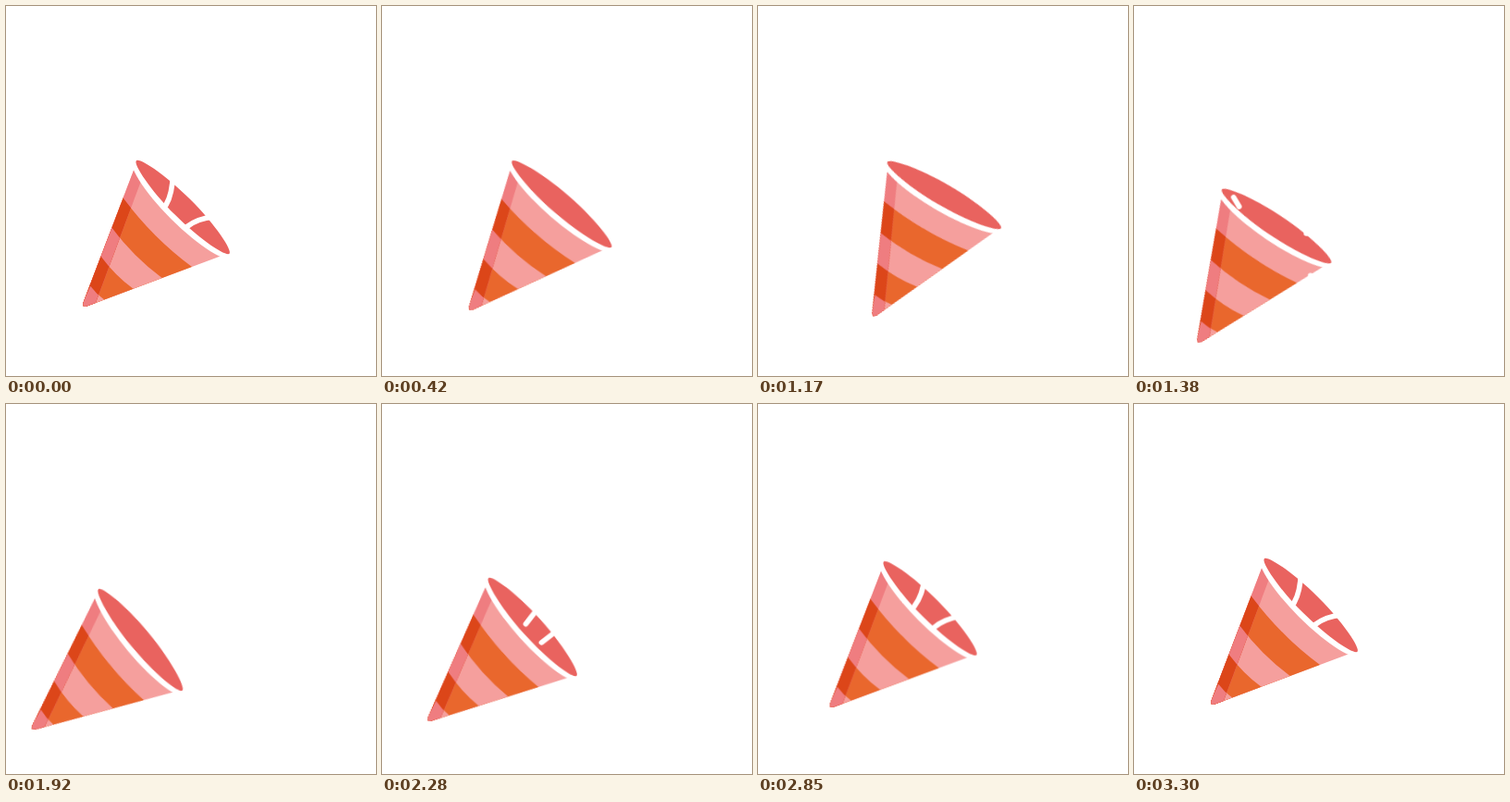
These frames come from a looping animation (400 by 400 pixels, 5.33 s). An HTML page without scripts:

```html
<!DOCTYPE html>
<html lang="en">
<head>
<meta charset="utf-8">
<title>Party popper</title>
<style>
  html, body { margin: 0; width: 100%; height: 100%; overflow: hidden; background: #fff; }
  svg { display: block; width: 100%; height: 100%; }

  .shift, .tilt, .strand, .bit { animation: 5.33s linear infinite; }
  .shift { animation-name: shift; }
  .tilt { animation-name: tilt; transform-origin: 146px 172px; }

  .light { --pink: #f59f9d; --orange: #e9672d; }
  .shade { --pink: #ef7d80; --orange: #dc4619; }
  .pink { fill: var(--pink); }
  .orange { fill: var(--orange); }

  .strand, .bit { fill: none; stroke: #fff; stroke-width: 5.6; stroke-linecap: round; }
  .left { animation-name: left; }
  .right { animation-name: right; }
  .bit { animation-name: fly; visibility: hidden; }

  /* recoil, then a slow drift back */
  @keyframes shift {
    0%, 22.51% { transform: translate(0, 0); }
    25.89% { transform: translate(-45px, 30px); }
    28.14% { transform: translate(-49px, 38px); }
    30.39% { transform: translate(-47px, 39px); }
    33.21% { transform: translate(-46px, 37px); }
    36.02% { transform: translate(-41.5px, 33.5px); }
    40.53% { transform: translate(-31px, 25px); }
    42.78% { transform: translate(-26px, 21.3px); }
    50.66% { transform: translate(-10px, 6.5px); }
    53.47% { transform: translate(-5px, 3.3px); }
    61.91%, 100% { transform: translate(0, 0); }
  }
  @keyframes tilt {
    0% { transform: rotate(0deg); animation-timing-function: cubic-bezier(.364, 0, .636, 1); }
    22.51% { transform: rotate(-14.8deg); }
    25.89% { transform: rotate(-11.2deg); }
    28.14% { transform: rotate(-6.5deg); }
    30.39% { transform: rotate(0deg); }
    33.21% { transform: rotate(4.6deg); }
    36.02% { transform: rotate(5.4deg); }
    42.78% { transform: rotate(3deg); }
    50.66% { transform: rotate(.7deg); }
    53.47% { transform: rotate(.2deg); }
    61.91%, 100% { transform: rotate(0deg); }
  }

  /* streamers pull in, then grow back */
  @keyframes left {
    0%, 61.91%, 100% { d: path("M180.5 181Q180 203 173 215"); visibility: visible; }
    7.5% { d: path("M172 217Q172 217 172 217"); visibility: visible; }
    7.51%, 39.95% { d: path("M203 189Q203 189 203 189"); visibility: hidden; }
    39.96% { d: path("M203 189Q203 189 203 189"); visibility: visible; }
    42.78% { d: path("M199 193Q191 204 183.7 214.7"); visibility: visible; }
    53.47% { d: path("M185 184Q183.5 203 174 215.5"); visibility: visible; }
  }
  @keyframes right {
    0%, 61.91%, 100% { d: path("M225 228Q207 229.5 195 239"); visibility: visible; }
    7.5% { d: path("M193 240Q193 240 193 240"); visibility: visible; }
    7.51%, 39.95% { d: path("M226 213Q226 213 226 213"); visibility: hidden; }
    39.96% { d: path("M226 213Q226 213 226 213"); visibility: visible; }
    42.78% { d: path("M221 217Q211 226 201.7 233.8"); visibility: visible; }
    53.47% { d: path("M224 226Q206 229 195 238.5"); visibility: visible; }
  }

  /* confetti bits crossing the cone */
  @keyframes fly {
    0%, 24.19% { transform: translate(var(--x), var(--y)); visibility: hidden; }
    24.2% { transform: translate(var(--x), var(--y)); visibility: visible; }
    25.89% { transform: translate(0, 0); visibility: visible; }
    27.58% { transform: translate(calc(0px - var(--x)), calc(0px - var(--y))); visibility: visible; }
    27.59%, 100% { transform: translate(0, 0); visibility: hidden; }
  }
</style>
</head>
<body>
<svg viewBox="0 0 400 400">
  <defs>
    <clipPath id="cone"><path d="M141.3 169L83.6 320.6Q82.2 326.2 87.4 324.6L241 267Z"/></clipPath>
    <clipPath id="side"><path d="M60 330V169H153.5L95 326Z"/></clipPath>
    <path id="wedge" d="M-40 40L50-153L54-148Q94-94 148-54L153-50Z"/>
    <g id="stripes">
      <rect class="pink" x="70" y="160" width="180" height="180"/>
      <g transform="translate(84 325)">
        <use href="#wedge" class="orange" transform="scale(.793)"/>
        <use href="#wedge" class="pink" transform="scale(.572)"/>
        <use href="#wedge" class="orange" transform="scale(.36)"/>
        <use href="#wedge" class="pink" transform="scale(.146)"/>
      </g>
    </g>
  </defs>

  <g class="shift"><g class="tilt">
    <g clip-path="url(#cone)">
      <use href="#stripes" class="light"/>
      <g clip-path="url(#side)"><use href="#stripes" class="shade"/></g>
    </g>
    <g transform="translate(191.2 217.5) rotate(45)">
      <ellipse rx="77" ry="18" fill="#fff"/>
      <path fill="#e9635f" d="M-71.2 0C-71.2-5-38-11.6 0-11.6S71.2-5 71.2 0S38 11.8 0 11.8S-71.2 5-71.2 0Z"/>
    </g>
    <path class="strand left" d="M180.5 181Q180 203 173 215"/>
    <path class="strand right" d="M225 228Q207 229.5 195 239"/>
  </g></g>

  <path class="bit" style="--x:30px;--y:20px" d="M108 207L114 217"/>
  <path class="bit" style="--x:-26px;--y:6px" d="M186 246h.1"/>
  <path class="bit" style="--x:-24px;--y:-30px" d="M190.5 291h.1"/>
</svg>
</body>
</html>
```
